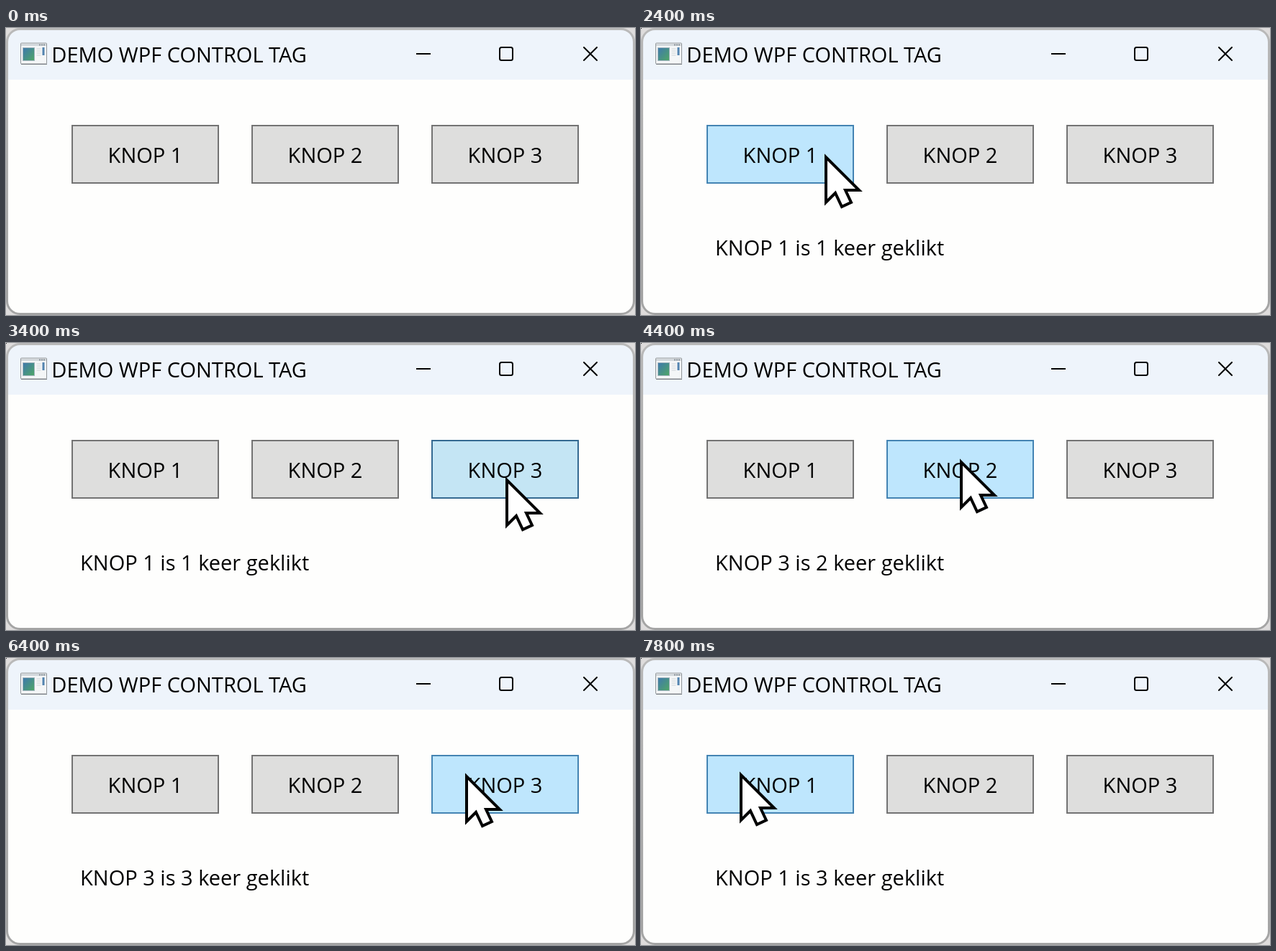
These frames come from a looping animation (874x400 px, 8 s). An HTML page:

```html
<!DOCTYPE html>
<html lang="nl">
<head>
<meta charset="utf-8">
<title>Demo</title>
<style>
  html, body { margin: 0; width: 100%; height: 100%; overflow: hidden; background: #dedcdc; }
  svg { display: block; }
  text { font: 29px "Open Sans", "Noto Sans", sans-serif; fill: #000; white-space: pre; }
  .button rect { fill: #dededd; stroke: #737373; stroke-width: 2; }
  .button text { text-anchor: middle; }
  .button.hover rect { fill: #bee6fd; stroke: #4484b3; }
  .button.pressed rect { fill: #c4e5f4; stroke: #356a92; }
  .glyph { fill: none; stroke: #000; stroke-width: 2; }
</style>
</head>
<body>
<svg width="874" height="400" viewBox="0 0 874 400">
  <defs>
    <linearGradient id="edge" x1="0" y1="0" x2="0" y2="1">
      <stop offset="0" stop-color="#b9b9b9"/>
      <stop offset="1" stop-color="#a4a4a4"/>
    </linearGradient>
    <linearGradient id="picture" x1="0" y1="0" x2="1" y2="1">
      <stop offset="0" stop-color="#3f78ae"/>
      <stop offset="1" stop-color="#4fa765"/>
    </linearGradient>
    <clipPath id="frame"><rect x="1" y="1" width="872" height="398" rx="18"/></clipPath>
  </defs>

  <g clip-path="url(#frame)">
    <rect width="874" height="400" fill="#fefefd"/>
    <rect width="874" height="72" fill="#eef4fb"/>
  </g>
  <rect x="1.5" y="1.5" width="871" height="397" rx="18" fill="none" stroke="url(#edge)" stroke-width="3"/>
  <rect id="corner" width="1" height="1" fill="#222"/>

  <g id="icon">
    <rect x="20.5" y="21" width="36" height="29" rx="1" fill="#f4f6f7" stroke="#92969a"/>
    <path d="M21 23.5H56" stroke="#d3d8dc" stroke-width="3"/>
    <path d="M46 23.5h8" stroke="#8d959c" stroke-width="2" stroke-dasharray="2 1"/>
    <rect x="23.5" y="27.5" width="16" height="18" fill="url(#picture)" stroke="#a3b5bf"/>
    <path d="M42.5 29h6M42.5 32h6M42.5 35h6M42.5 38h6" stroke="#d0d5d9"/>
    <rect x="50.5" y="27" width="3" height="11" fill="#5283b0"/>
    <path d="M21 50.5H57" stroke="#777b80"/>
  </g>
  <text x="63.3" y="48">DEMO WPF CONTROL TAG</text>

  <path class="glyph" d="M570 36H590"/>
  <rect class="glyph" x="686" y="27" width="18" height="18" rx="2.5"/>
  <path class="glyph" d="M803 27L821 45M821 27L803 45" stroke-linecap="round"/>

  <g id="buttons"></g>
  <text id="message" x="103" y="317"></text>
  <path id="cursor" d="M0 0V63L13 50L22 69L35 63L27 46H46Z" fill="#fff" stroke="#000" stroke-width="4"/>
</svg>

<script>
const LOOP = 8000, STEP = 200, ARC = 8;
const LEFT = [0, 1, 2].map(i => 92 + 250 * i), TOP = 136, WIDTH = 203, HEIGHT = 80;

// Places where the pointer rests; it glides from one to the next.
const STOPS = [
  { arrive: 1200, leave: 1200, x: 700, y: 6 },
  { arrive: 1600, leave: 1800, x: 680, y: 174 },
  { arrive: 2200, leave: 2400, x: 257, y: 180 },
  { arrive: 3000, leave: 3000, x: 810, y: 212 },
  { arrive: 3400, leave: 3600, x: 696, y: 191 },
  { arrive: 4400, leave: 4800, x: 445, y: 166 },
  { arrive: 5570, leave: 6400, x: 640, y: 165 },
  { arrive: 7000, leave: LOOP, x: 139, y: 163 }
];
const PRESSES = [1600, 2200, 3400, 4600, 5800, 7000, 7600];

const byId = id => document.getElementById(id);
const mix = (a, b, k) => a + (b - a) * k;
const ease = k => k * k * (3 - 2 * k);

byId("buttons").innerHTML = LEFT.map((x, i) => `
  <g class="button">
    <rect x="${x}" y="${TOP}" width="${WIDTH}" height="${HEIGHT}"/>
    <text x="${x + WIDTH / 2}" y="188">KNOP ${i + 1}</text>
  </g>`).join("");
const buttons = [...document.querySelectorAll(".button")];

function pointerAt(t) {
  const i = STOPS.findLastIndex(s => s.arrive <= t);
  if (i < 0) return null;
  const from = STOPS[i], to = STOPS[i + 1];
  if (t <= from.leave || !to) return from;
  const k = (t - from.leave) / (to.arrive - from.leave);
  return {
    x: mix(from.x, to.x, ease(k)),
    y: mix(from.y, to.y, ease(k)) - ARC * 4 * k * (1 - k)
  };
}

function buttonAt(point) {
  if (!point || point.y < TOP || point.y > TOP + HEIGHT) return -1;
  return LEFT.findIndex(left => point.x >= left && point.x <= left + WIDTH);
}

// A click counts once the button is released, one step after the press.
function messageAt(t) {
  const clicked = PRESSES.filter(p => p + STEP <= t).map(p => buttonAt(pointerAt(p)));
  if (!clicked.length) return "";
  const last = clicked[clicked.length - 1];
  const count = clicked.filter(b => b === last).length;
  return `KNOP ${last + 1} is ${count} keer geklikt`;
}

function draw(t) {
  const point = pointerAt(t), over = buttonAt(point), down = PRESSES.includes(t);
  buttons.forEach((b, i) => {
    b.classList.toggle("hover", i === over);
    b.classList.toggle("pressed", i === over && down);
  });
  byId("message").textContent = messageAt(t);
  byId("corner").style.display = t >= 600 ? "" : "none";
  const cursor = byId("cursor");
  cursor.style.display = point ? "" : "none";
  if (point) {
    cursor.setAttribute("transform", `translate(${Math.round(point.x)} ${Math.round(point.y)})`);
  }
}

let start, shown;
function tick(now) {
  start ??= now;
  const t = Math.floor(((now - start) % LOOP) / STEP) * STEP;
  if (t !== shown) draw(shown = t);
  requestAnimationFrame(tick);
}
draw(0);
requestAnimationFrame(tick);
</script>
</body>
</html>
```
